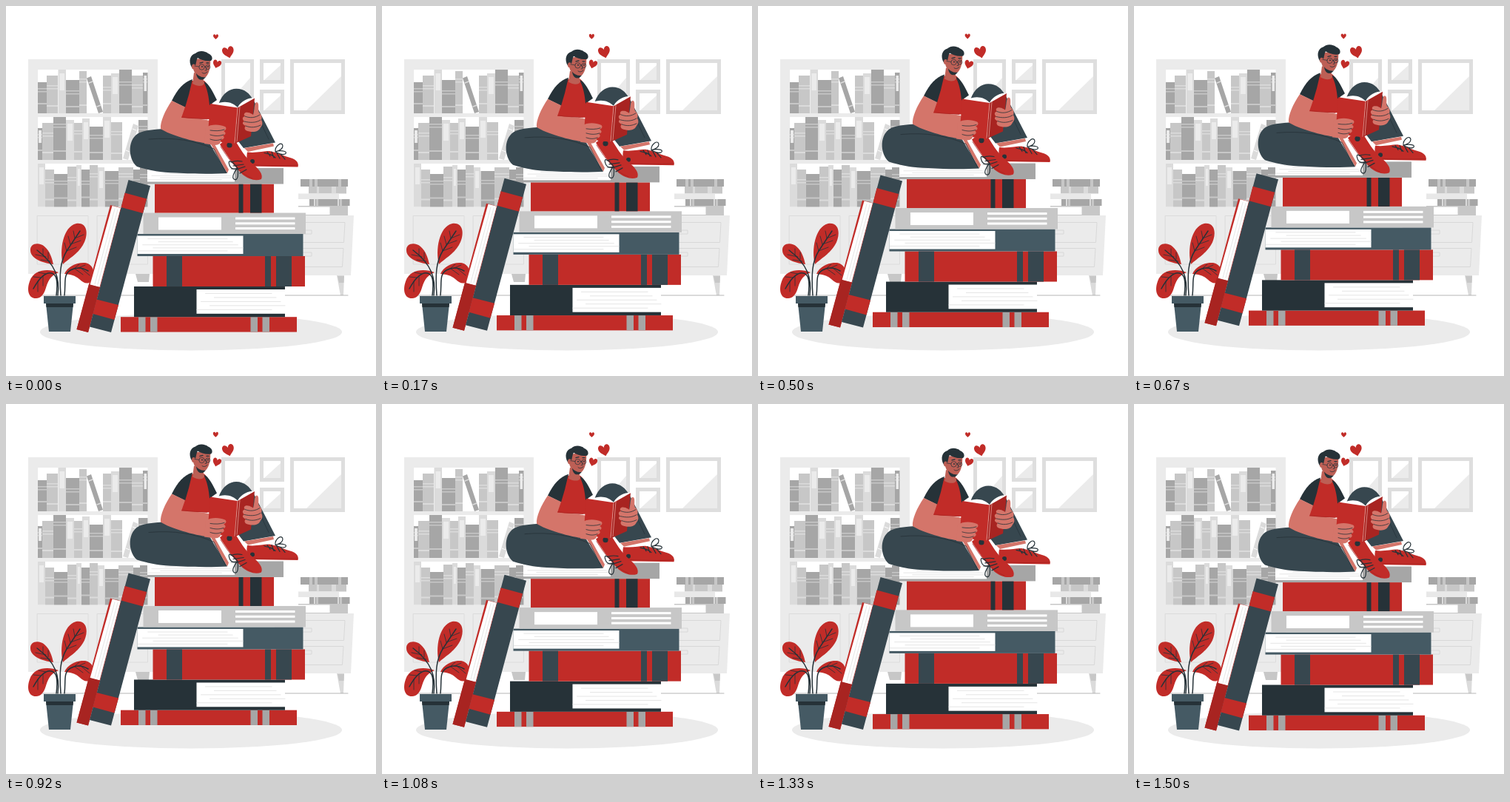
These frames come from a looping animation (500x500 px, 1540 ms). An HTML page:

```html
<!DOCTYPE html>
<html lang="en">
<head>
<meta charset="utf-8">
<title>Reading on a pile of books</title>
<style>
html, body { margin: 0; width: 100%; height: 100%; overflow: hidden; background: #fff; }
svg { display: block; width: 100vw; height: 100vh; }
</style>
</head>
<body>
<svg viewBox="0 0 500 500">
  <g id="room"></g>
  <g id="plant"></g>
  <g id="hearts"></g>
  <g id="pile"></g>
</svg>
<script>
const RED = '#c12c28', DEEP = '#a82421', SLATE = '#37474f', BLUE = '#455a64', INK = '#263238';
const SKIN = '#d4756a', FACE = '#bd5f55', G1 = '#a6a6a6', G2 = '#c7c7c7', G3 = '#dbdbdb', G4 = '#ebebeb', WHITE = '#fff';

let layer;
const use = id => { layer = document.getElementById(id); };
function add(tag, attrs) {
  const el = document.createElementNS('http://www.w3.org/2000/svg', tag);
  for (const k in attrs) el.setAttribute(k, attrs[k]);
  layer.appendChild(el);
  return el;
}
// Boxes are given by their edges.
const box = (x, y, x2, y2, fill) => add('rect', { x, y, width: x2 - x, height: y2 - y, fill });
const poly = (points, fill) => add('polygon', { points, fill });
const shape = (d, fill) => add('path', { d, fill });
const line = (d, stroke = INK, w = 1) =>
  add('path', { d, stroke, 'stroke-width': w, fill: 'none', 'stroke-linecap': 'round', 'stroke-linejoin': 'round' });
const dot = (cx, cy, r, fill) => add('circle', { cx, cy, r, fill });

// Books on a shelf: left, right, top, shade.
function shelf(bottom, books) {
  books.forEach(([x, x2, y, tone], i) => {
    box(x, y, x2, bottom, [G1, G2, G3][tone]);
    const band = [G2, G3, G4][tone];
    if (tone === 2) box(x + 2, y + 5, x2 - 2, y + 28, G4);
    else {
      const top = y + 8 + i * 5 % 9, low = bottom - 14 + i * 3 % 5;
      box(x, top, x2, top + 1.5, band);
      box(x, top + 4, x2, top + 5.5, band);
      box(x, low, x2, low + 2, band);
    }
  });
}

function picture(x, y, x2, y2, a, b) {
  box(x, y, x2, y2, '#dedede');
  box(x + 5, y + 5, x2 - 5, y2 - 5, WHITE);
  poly(`${x2 - 5},${a} ${x2 - 5},${y2 - 5} ${b},${y2 - 5}`, G4);
}

function pages(x, y, x2, y2) {
  box(x, y, x2, y2, WHITE);
  const gap = (y2 - y) / 6, w = x2 - x;
  for (let i = 1; i < 6; i++) {
    const s = x + w * (i * 7 % 5) * .05, e = x2 - w * (i * 3 % 4) * .05;
    line(`M${s},${y + gap * i}H${e}`, '#d4d4d4', .6);
  }
}

function drawRoom() {
  use('room');
  box(30, 72, 205, 362, G4);
  for (const y of [86, 150, 213]) box(43, y, 191.5, [145, 208, 271.5][[86, 150, 213].indexOf(y)], WHITE);
  shelf(145, [[43, 55, 103, 0], [55, 70, 94, 1], [70.5, 81, 86, 2], [81, 99, 100, 0], [99, 109, 88, 1],
    [131, 142, 94, 1], [142, 153, 91, 2], [153, 170, 86, 0], [170, 185, 94, 1], [185, 191.5, 90, 0]]);
  box(186.5, 94, 190, 115, G4);
  poly('109,97.5 115,95 131,143 125,145', G1);
  line('M112,104l5,-2M123,136l5,-2', G3, 1.5);
  shelf(208, [[43, 49, 165, 0], [49, 64, 158, 1], [64, 81, 150, 0], [81, 92, 154, 2], [92, 103, 158, 1],
    [103, 113, 152, 2], [113, 131, 163, 0], [131, 142, 150, 2], [142, 157, 157, 1], [179, 191.5, 154, 0]]);
  box(44, 168, 48, 185, G4);
  poly('172,159 179,162 165,208 158,206', G3);
  line('M171,166l5,2M162,195l5,2', WHITE, 1);
  shelf(271.5, [[43, 53, 213, 2], [53, 65, 221, 1], [65, 83, 227, 0], [83, 95, 217, 1], [95, 102, 215, 2],
    [102, 113, 221, 0], [113, 124, 215, 1], [124, 133, 218, 2], [133.5, 152, 223, 0], [152, 172, 218, 1],
    [172, 181, 221, 0], [181, 191.5, 218, 0]]);
  line('M42.5,283.5H111V349H42.5ZM123.5,283.5H191.5V349H123.5Z', '#d9d9d9', .8);
  poly('175,362 194,362 193,373 178,373', G2);
  poly('41,362 57,362 55,373 44,373', G2);

  picture(291, 72, 335, 146, 97, 292);
  picture(343, 72, 376, 105, 80, 349);
  picture(343, 113, 376, 146, 121, 349);
  picture(384, 72, 458, 146, 95, 406);

  poly('363,283 470,283 466,364 363,364', G4);
  line('M390,292.5H458L456.500,319.500H390M390,327.500H456L454.500,352.500H390', '#d4d4d4', .8);
  line('M390,303H413V308H390M390,333H413V338H390', '#d4d4d4', .8);
  poly('447,364 457,364 456,391 452,391', G3);
  poly('448,365 457,365 456.500,374 450,374', G2);

  box(398, 234, 462, 244, G1);
  for (const x of [410, 417, 449]) box(x, 234, x + 4, 244, G2);
  box(409, 244, 460, 253.5, G2);
  box(420, 244, 423, 253.5, G3);
  box(440, 244, 446, 253.5, G3);
  box(395, 253.5, 450, 261, '#e8e8e8');
  box(410, 261, 464.5, 270, G1);
  for (const x of [416, 448]) { box(x, 261, x + 2, 270, G3); box(x + 3, 261, x + 6, 270, G2); }
  box(395, 270, 462, 283, G2);
  box(395, 271.5, 437.5, 282, WHITE);

  line('M40,391H462', '#a3a3a3', .8);
  add('ellipse', { cx: 250, cy: 440.5, rx: 204, ry: 25, fill: G4 });
}

function drawPlant() {
  use('plant');
  shape('M77,349C72,330 77,298 95,294C112,292 111,312 104,323C97,335 84,342 77,349Z', RED);
  shape('M64,349C54,348 34,343 33,331C32,320 45,319 52,325C60,332 62,341 64,349Z', RED);
  shape('M79,362C83,352 96,346 107,347C119,349 121,363 116,371C111,377 105,375 99,369C93,364 88,363 79,362Z', RED);
  shape('M71,360C58,355 38,355 32,372C27,386 32,396 41,395C52,394 53,382 56,375C59,367 64,363 71,360Z', RED);
  line('M74,391C72,362 73,346 82,331L100,304M79,391C81,374 77,363 87,357C94,353 103,353 111,358M70,391C73,368 67,349 42,330M68,391C70,374 70,359 57,361C49,363 43,371 37,382', INK, 1.5);
  line('M82,331L79,320M87,322L84,311M93,314L91,304M82,331L95,326M87,322L101,317M93,314L105,309', INK, .8);
  line('M60,345L47,343M54,339L40,336M57,342V333M50,336V328M92,355L99,349M98,354L107,350M93,355L104,363M101,354L113,364M54,362L44,360M47,367L37,366M50,365V378M43,372L43,386', INK, .8);
  poly('54,402 91,402 87,440 58,440', BLUE);
  poly('54,402 91,402 90.500,407 54.500,407', INK);
  box(51, 392, 94, 402, BLUE);
}

function drawHearts() {
  use('hearts');
  const one = (x, y, w, h, turn) => add('path', {
    d: 'M0,1C-.3,.6 -1,.3 -1,-.35C-1,-1.1 -.2,-1.1 0,-.45C.2,-1.1 1,-1.1 1,-.35C1,.3 .3,.6 0,1Z',
    fill: RED, transform: `translate(${x} ${y}) rotate(${turn}) scale(${w} ${h})`
  });
  one(283.5, 41.500, 3.5, 3.6, 0);
  one(300.500, 62.500, 7.8, 8, -14);
  one(285, 78.500, 5.6, 5.8, 16);
}

function drawBooks() {
  poly('141,269 156,273 111,441 95.500,437', RED);
  poly('143.500,270 155,273 126.500,380 113.500,377', WHITE);
  line('M147,274L120,376M151,275L124,376', '#d4d4d4', .6);
  poly('112,376 127,380 111,441 95.500,437', DEEP);
  poly('165.500,235 195,243 142,441 113,433.500', SLATE);
  poly('160.500,252.500 190,260.500 185,280 155.500,272', RED);
  poly('122.500,396.500 152,404 146.500,424 117.500,416', RED);

  box(155, 420.200, 393, 440.500, RED);
  for (const x of [179, 195, 330.500, 346.500]) box(x, 420.200, x + 9.500, 440.500, G1);
  box(173, 379, 377, 420.200, INK);
  pages(257.500, 383, 377, 415.800);
  box(198.500, 338, 404, 379, RED);
  for (const [x, x2] of [[217, 238], [350, 358], [365, 386]]) box(x, 338, x2, 379, SLATE);
  box(177.500, 308, 401.500, 338, BLUE);
  pages(177.500, 310.500, 320.500, 335);
  box(185.500, 279.500, 405, 308, G2);
  box(206, 285.500, 291, 302.500, WHITE);
  for (const y of [285.500, 292.300, 299]) box(310, y, 390.500, y + 3, WHITE);
  box(201, 240.500, 362, 279.500, RED);
  box(314.500, 240.500, 320.500, 279.500, INK);
  box(330, 240.500, 345.500, 279.500, INK);
  box(191, 219, 375, 240.500, G1);
  pages(191, 221, 309, 237.500);
}

function drawMan() {
  // Far leg and shoe
  shape('M287,133C294,113 308,109 319,113C328,116 333,124 338,134L364,184.500L321,192L300,165Z', SLATE);
  line('M330,128L355,180', INK, .7);
  poly('322,192 361,185.500 362,189.500 327,197', SKIN);
  shape('M326,197.500C338,199 347,196 356,196C368,198 375,203 384,205C393,207 396,213 394.500,217.500L328,216.500C325,210 325,203 326,197.500Z', RED);
  line('M328,214.500C350,216 374,216 394,215', DEEP, .8);
  dot(333, 210, 3, INK);
  line('M349,198.500C356,200 360,201 364,205M353,197L357,203M359,197L362,205M365,197L370,206M371,200L377,207M364,197C363,189 373,182 374,189C374,194 368,196 364,197C373,194 382,197 377,200C372,202 368,199 364,197', INK, 1.2);

  // Near leg and shoe
  poly('278,188 291,184 310,214 299,226', WHITE);
  poly('277,187 282,187 301,221 299,226', SKIN);
  shape('M238,165C214,166 194,166 181,171C164,178 164,206 177,217C192,222 210,225 230,225.500C255,227 280,227 299,226L276,187C263,179 250,171 238,165Z', SLATE);
  line('M193,180C228,177 256,182 281,193L297,225', INK, .8);
  shape('M289,187C295,181 303,180 311,184C317,193 322,203 333,213C342,220 348,228 345,234C337,237 328,234 320,228C309,217 299,203 289,187Z', RED);
  line('M290,190C302,209 315,226 333,233', DEEP, .8);
  dot(302, 188, 3.600, INK);
  line('M304,211C309,209 314,209 319,210M307,216L321,214M311,221L323,217M316,226L325,221M313,219C305,208 299,207 302,215C304,221 309,221 313,219C308,224 304,233 309,234.500C314,236 314,226 313,219', INK, 1.2);

  // Body and near arm
  shape('M249,101L268,101C276,108 280,123 278,136L275,153L235,152C242,138 244,118 249,101Z', RED);
  shape('M252,99L247,120L242,137L224,128C232,112 240,103 252,99Z', INK);
  shape('M267,102C274,104 280,117 285,127L275,134C274,122 272,112 267,102Z', INK);
  shape('M254,90L267,94V101C271,107 262,111 252,105Z', FACE);
  shape('M224,128L242,136.500L237,151C250,152 264,152 275,155V186C254,184 221,174 209,166C208,157 215,141 224,128Z', SKIN);
  line('M238,150C250,152 262,152 272,153', DEEP, .7);

  // Head
  shape('M253,72L276,70C277,80 275,91 270,96C262,99 254,93 253,84Z', FACE);
  shape('M257,91C260,95 265,97 270,96C266,102 258,101 257,91Z', INK);
  shape('M251,83C246,74 249,66 256,64C261,59 270,61 273,64C279,66 280,72 277,74C270,75 264,73 259,70C257,73 257,79 255,83Z', INK);
  add('ellipse', { cx: 253.500, cy: 82, rx: 2.500, ry: 3.500, fill: FACE });
  line('M262,77l4,-1M271,77l3,0', INK, 1.3);
  dot(265, 82, 1, INK);
  dot(273, 82, 1, INK);
  for (const [cx, r] of [[264.500, 3.700], [272.800, 3]])
    add('circle', { cx, cy: 82.500, r, fill: 'none', stroke: INK, 'stroke-width': .7 });
  line('M255,81L261,82M268.500,82h1.500M270,82l1,5l-2,0', INK, .7);
  line('M265,90C267,92 270,91 272,89', INK, .9);

  // Open book
  shape('M283,133C295,127 306,130 313,137C318,128 327,124 336,124L330,150L313,160L285,150Z', WHITE);
  shape('M276,132L313,137.500L309,186L291,184L273.500,165Z', RED);
  shape('M313,137.500L336,124.500L331,176L309,186Z', DEEP);
  line('M316,136L312,183M313,138L309,185', '#e59a94', .8);

  // Hands
  shape('M270,164C278,159 289,160 296,163C299,165 297,168 294,169C298,171 297,174 293,175C296,177 295,180 290,181C291,185 288,188 282,188L268,186Z', SKIN);
  line('M276,168C283,169 289,169 295,167M276,174C283,176 288,176 294,174M276,180C282,182 286,182 291,180', INK, .8);
  shape('M334,147C336,141 335,130 339,130C343,131 340,140 342,144C346,147 346,151 345,154C347,157 347,161 344,164C342,170 333,172 324,168C322,166 322,164 324,162C319,160 319,157 322,156C319,153 319,150 323,149C320,146 323,143 327,144C330,144 332,146 334,147Z', SKIN);
  line('M323,149C330,152 337,151 343,147M322,156C330,158 338,158 344,154M324,162C331,165 338,164 344,161', INK, .8);
}

drawRoom();
drawPlant();
drawHearts();
use('pile');
drawBooks();
drawMan();

// The pile rises and sinks at constant speed, one pose per tick.
const LOOP = 1540, TICKS = 37, LEAD = 60, RISE = 10;
const pile = document.getElementById('pile'), hearts = document.getElementById('hearts');
function render(now) {
  const tick = Math.floor(now % LOOP / LOOP * TICKS + .15) % TICKS;
  const t = tick * LOOP / TICKS;
  const p = (t + LEAD) % LOOP / LOOP;
  const lift = RISE * (1 - Math.abs(1 - 2 * p));
  pile.setAttribute('transform', `translate(0 ${(.8 - lift).toFixed(2)})`);
  const beat = t < 1100 ? 1 + .03 * Math.sin(Math.PI * t / 1100) : 1;
  hearts.setAttribute('transform', `translate(294 64) scale(${beat.toFixed(4)}) translate(-294 -64)`);
}
const start = performance.now();
function loop(now) {
  render(Math.max(0, now - start));
  requestAnimationFrame(loop);
}
render(0);
requestAnimationFrame(loop);
</script>
</body>
</html>
```
